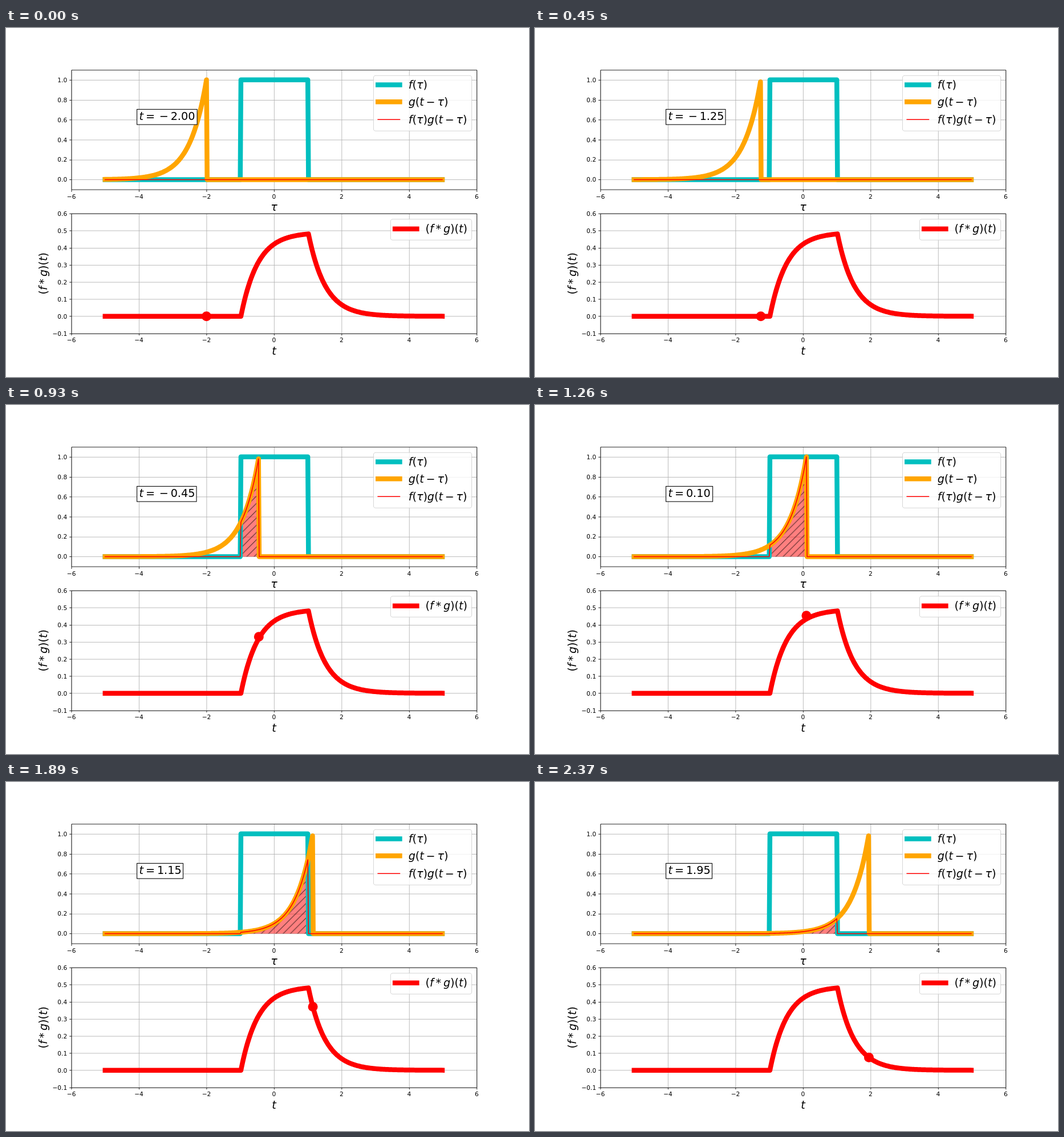
An HTML page that plays this animation: 917x611 px, repeating every 2.4 s.

```html
<!DOCTYPE html>
<html lang="en">
<head>
<meta charset="utf-8">
<title>Convolution</title>
<style>
html, body { margin: 0; width: 100%; height: 100%; overflow: hidden; background: #fff; }
svg { display: block; font-family: "DejaVu Sans", sans-serif; font-size: 10.6px; font-kerning: none; }
.math { font-size: 19.1px; }
.value { font-size: 19.2px; }
.it { font-style: oblique; }
.grid { stroke: #b0b0b0; stroke-width: .85; }
.axis { stroke: #000; stroke-width: .85; fill: none; }
.line { fill: none; stroke-width: 8.49; stroke-linejoin: round; stroke-linecap: square; }
.thin { stroke-width: 1.59; }
.f { stroke: #00bfbf; }
.g { stroke: #ffa500; }
.r { stroke: #f00; }
.legend { fill: #fff; fill-opacity: .8; stroke: #ccc; stroke-opacity: .8; stroke-width: 1.06; }
</style>
</head>
<body>
<svg id="stage" width="917" height="611" viewBox="0 0 917 611"></svg>
<script>
const LEFT = 114.6, RIGHT = 825.3;
const TOP = { y0: 73.3, y1: 283, min: -0.1, max: 1.1 };
const LOW = { y0: 324.9, y1: 534.6, min: -0.1, max: 0.6 };
const N = 500, DT = 0.02, STEP_MS = 30, STEPS = 80;

const tau = i => -5 + i * DT;
const px = x => LEFT + (x + 6) / 12 * (RIGHT - LEFT);
const py = (ax, y) => ax.y1 - (y - ax.min) / (ax.max - ax.min) * (ax.y1 - ax.y0);
const range = (a, b, step) =>
  Array.from({ length: Math.round((b - a) / step) + 1 }, (_, i) => a + i * step);

// Hairlines sit on the pixel centres of a 1200 px wide plot
const PIXEL = 917 / 1200;
const snap = v => (Math.round(v / PIXEL) + 0.5) * PIXEL;

const f = i => i > 200 && i <= 300 ? 1 : 0;
const g = s => s > -1e-6 ? Math.exp(-2 * s) : 0;

const path = (ax, fn) => "M" + Array.from({ length: N }, (_, i) =>
  px(tau(i)).toFixed(2) + "," + py(ax, fn(i)).toFixed(2)).join("L");

// Discrete convolution, cropped to the central N samples
function convolved(n) {
  let sum = 0;
  for (let i = 201; i <= 300; i++) {
    const j = n + N / 2 - i;
    if (j > 250 && j < N) sum += Math.exp(-2 * tau(j));
  }
  return sum * DT;
}

// Letters slanted, operators spaced
function math(s) {
  let gap = 0;
  return [...s].map(c => {
    const op = "=−*".includes(c);
    const dx = gap + (op ? 0.2 : 0);
    gap = op ? 0.2 : 0;
    return `<tspan${/[a-zτ]/.test(c) ? ' class="it"' : ""}${dx ? ` dx="${dx}em"` : ""}>${c}</tspan>`;
  }).join("");
}

const text = (x, y, s, attrs = "") => `<text x="${x}" y="${y}" ${attrs}>${s}</text>`;
const formula = (x, y, s, attrs = "") => text(x, y, math(s), `class="math" ${attrs}`);
const seg = (x1, y1, x2, y2, cls) =>
  `<line class="${cls}" x1="${x1}" y1="${y1}" x2="${x2}" y2="${y2}"/>`;
const hair = (x1, y1, x2, y2, cls) => seg(snap(x1), snap(y1), snap(x2), snap(y2), cls);
const num = (v, digits) => v.toFixed(digits).replace("-", "−");

const xs = range(-6, 6, 2);
const topTicks = range(0, 1, 0.2);
const lowTicks = range(-1, 6, 1).map(v => v / 10);

const grid = (ax, ys) =>
  xs.map(x => hair(px(x), ax.y0, px(x), ax.y1, "grid")).join("") +
  ys.map(y => hair(LEFT, py(ax, y), RIGHT, py(ax, y), "grid")).join("");

const axes = (ax, ys) =>
  `<path class="axis" d="M${snap(LEFT)} ${snap(ax.y0)}H${snap(RIGHT)}V${snap(ax.y1)}H${snap(LEFT)}Z"/>` +
  xs.map(x => hair(px(x), ax.y1, px(x), ax.y1 + 3.7, "axis") +
    text(px(x), ax.y1 + 15.6, num(x, 0), 'text-anchor="middle"')).join("") +
  ys.map(y => hair(LEFT - 3.7, py(ax, y), LEFT, py(ax, y), "axis") +
    text(LEFT - 7.4, py(ax, y) + 3.9, num(y, 1), 'text-anchor="end"')).join("");

const entry = (x, y, cls, s) =>
  seg(x, y, x + 38.2, y, "line " + cls) + formula(x + 53.5, y + 6.5, s);

const legend = (x, y, h) =>
  `<rect class="legend" x="${x}" y="${y}" width="${816.6 - x}" height="${h}" rx="3.8"/>`;

const stage = document.getElementById("stage");
stage.innerHTML = `
  <defs>
    <pattern id="hatch" width="12.736" height="12.736" patternUnits="userSpaceOnUse">
      <rect width="12.736" height="12.736" fill="#f00" fill-opacity=".5"/>
      <path d="M-2 2L2 -2M-2 14.736L14.736 -2M10.736 14.736L14.736 10.736" stroke="#000" stroke-opacity=".7"/>
    </pattern>
  </defs>
  ${grid(TOP, topTicks)}${grid(LOW, lowTicks)}
  <path id="area" fill="url(#hatch)"/>
  <path class="line f" d="${path(TOP, f)}"/>
  <path class="line g" id="kernel"/>
  <path class="line thin r" id="product"/>
  <path class="line r" d="${path(LOW, convolved)}"/>
  <circle id="dot" r="8.5" fill="#f00"/>
  ${axes(TOP, topTicks)}${axes(LOW, lowTicks)}
  ${formula(470, 319.6, "τ", 'text-anchor="middle"')}
  ${formula(470, 571.5, "t", 'text-anchor="middle"')}
  ${formula(0, 0, "(f*g)(t)", 'text-anchor="middle" transform="translate(71.5 429.8) rotate(-90)"')}
  <rect id="box" x="229.6" y="142.4" height="26.7" fill="#fff" stroke="#000" stroke-width="1.06"/>
  <text id="value" class="value" x="233.6" y="160.6"></text>
  ${legend(644.4, 83.3, 97)}
  ${entry(652.2, 99.6, "f", "f(τ)")}
  ${entry(652.2, 129.2, "g", "g(t−τ)")}
  ${entry(652.2, 160.2, "thin r", "f(τ)g(t−τ)")}
  ${legend(674.3, 334.7, 36.6)}
  ${entry(682.1, 351.7, "r", "(f*g)(t)")}`;

const [area, kernel, product, dot, box, value] =
  ["area", "kernel", "product", "dot", "box", "value"].map(id => document.getElementById(id));

function draw(step) {
  const t = (step - 40) / 20;
  const kern = i => g(t - tau(i));
  const prod = i => f(i) * kern(i);
  let sum = 0;
  for (let i = 0; i < N; i++) sum += prod(i) * DT;

  const curve = path(TOP, prod);
  kernel.setAttribute("d", path(TOP, kern));
  product.setAttribute("d", curve);
  area.setAttribute("d", sum ? curve + "Z" : "");
  dot.setAttribute("cx", px(t));
  dot.setAttribute("cy", py(LOW, sum));

  value.innerHTML = math("t=" + num(t, 2));
  const right = (t < 0 ? 335.1 : 311.6) - (step % 2 ? 1.1 : 0);
  box.setAttribute("width", right - 229.6);
}

const start = performance.now();
let shown = -1;
function tick() {
  const step = Math.floor((performance.now() - start) / STEP_MS) % STEPS;
  if (step !== shown) draw(shown = step);
  requestAnimationFrame(tick);
}
tick();
</script>
</body>
</html>
```
